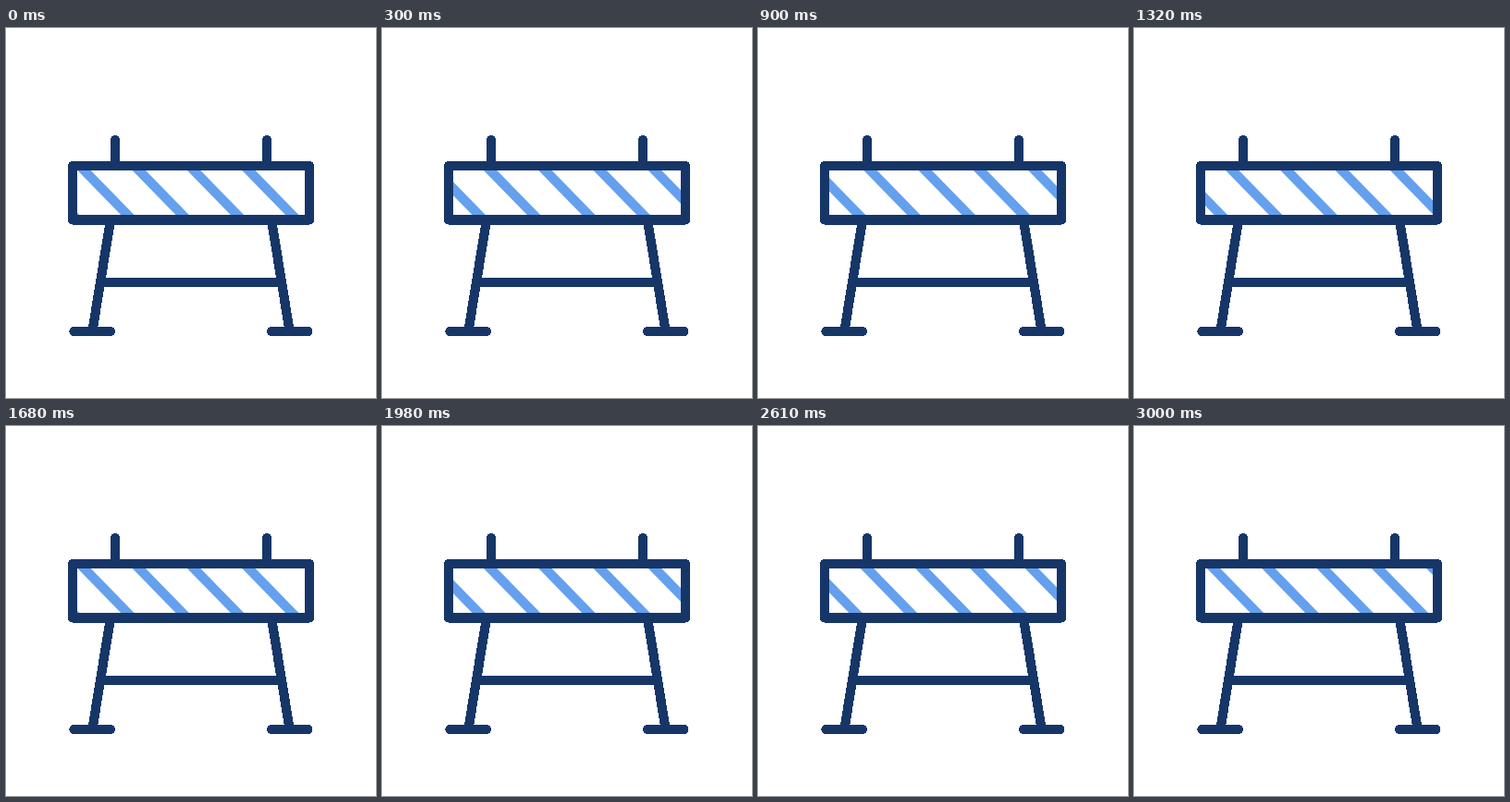
These frames come from a looping animation (400 by 400 pixels, 3090 ms). An HTML page:

```html
<!DOCTYPE html>
<html lang="en">
<head>
<meta charset="utf-8">
<title>Road barrier</title>
<style>
  html, body { margin: 0; width: 100%; height: 100%; overflow: hidden; background: #fff; }
  svg { display: block; width: 100vw; height: 100vh; }
  .frame {
    fill: none; stroke: #173668; stroke-width: 10.2;
    stroke-linecap: round; stroke-linejoin: round; shape-rendering: crispEdges;
  }
  .stripes { fill: none; stroke: #65a0ee; stroke-width: 10.3; }
</style>
</head>
<body>
<svg viewBox="0 0 400 400">
  <clipPath id="panel"><rect x="74" y="150" width="252" height="56"/></clipPath>
  <g clip-path="url(#panel)"><path class="stripes" id="stripes"/></g>
  <g class="frame">
    <path d="M118 121V148M282 121V148"/>
    <path d="M112.6 210L94 324M287.4 210L306 324"/>
    <path d="M104 275H296"/>
    <path d="M73.5 328H113M287 328H326.5"/>
    <rect x="72" y="149" width="256" height="58.5"/>
  </g>
</svg>
<script>
  const STEP = 30, LOOP = 3090, END = 3000;
  const CYCLE = 560, LAST = 4 * CYCLE; // the fifth cycle runs longer
  const GAP = 59.3, TRAVEL = 60.9;
  const stripes = document.getElementById('stripes');

  // Five diagonals, the first one waiting left of the panel.
  let d = '';
  for (let i = -1; i < 4; i++) {
    const x = 84.1 + i * GAP;
    d += `M${x - 9.8} 143.5L${x + 57.8} 212.8`;
  }
  stripes.setAttribute('d', d);

  function shift(t) {
    if (t < LAST) return TRAVEL * (t % CYCLE) / CYCLE;
    const u = (t - LAST) / (END - LAST);
    return TRAVEL * u * (1.25 - 0.25 * u);
  }

  const start = performance.now();
  function draw() {
    const t = (performance.now() - start) % LOOP;
    const stepped = Math.min(END, Math.floor(t / STEP) * STEP);
    stripes.setAttribute('transform', `translate(${shift(stepped).toFixed(3)} 0)`);
    requestAnimationFrame(draw);
  }
  draw();
</script>
</body>
</html>
```
